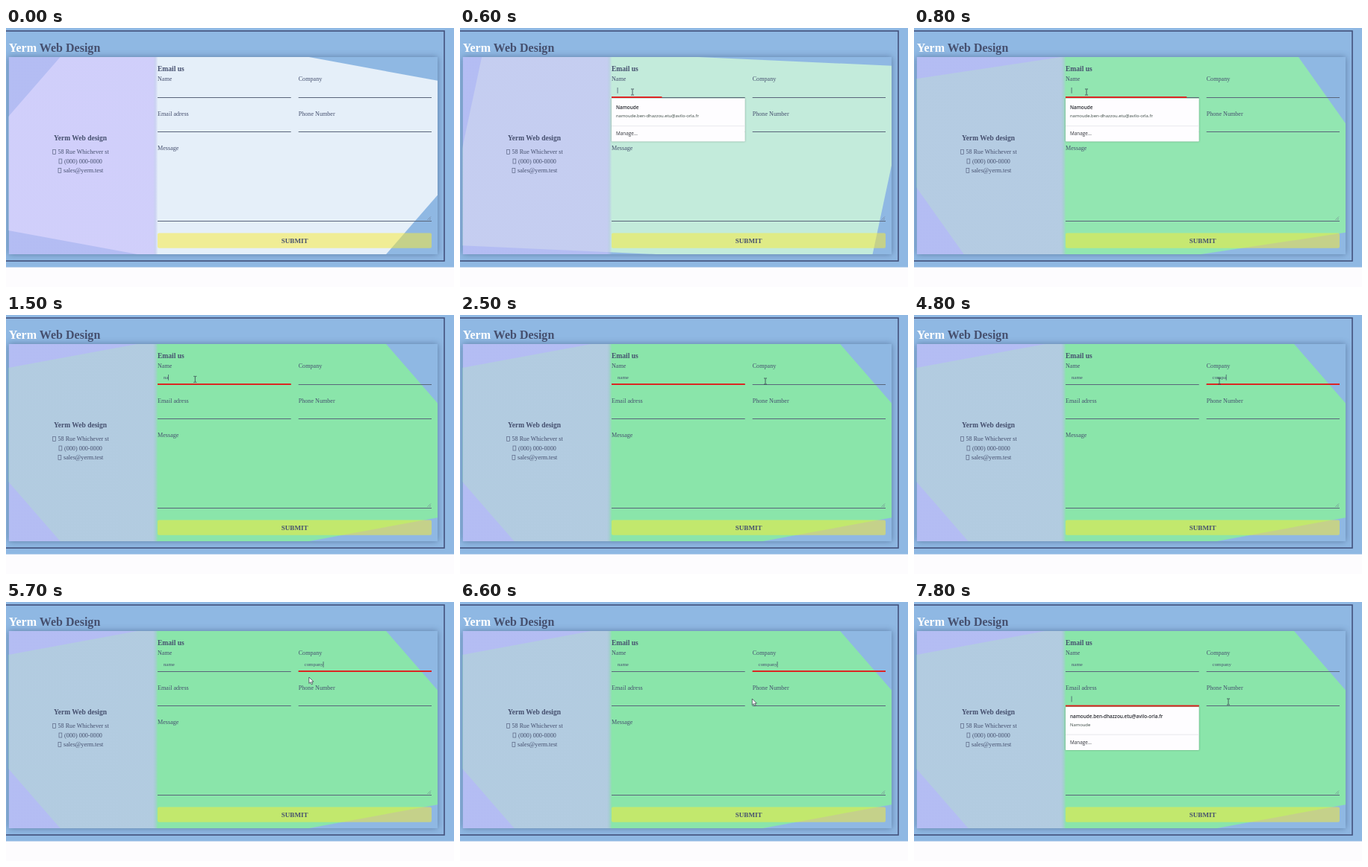
Recreate the animation shown at these times as an HTML page. Size 600 by 348 pixels, loop 8000 ms.

```html
<!DOCTYPE html>
<html lang="en">
<head>
<meta charset="utf-8">
<title>Contact form</title>
<style>
  html, body { margin: 0; width: 100%; height: 100%; overflow: hidden; background: #fdfcfe; }
  svg { display: block; width: 600px; height: 348px; }
  text { font: 8.15px "Liberation Serif", serif; fill: #46506f; white-space: pre; }
  .bold { font-weight: 700; }
  .heading { font-size: 9.5px; }
  .title { font-size: 16.05px; }
  .submit { font-size: 9.1px; }
  .value { font-size: 6.9px; }
  .menu text { font: 5.9px "Open Sans", sans-serif; fill: #37453f; }
  .menu .main { font-size: 6.4px; font-weight: 600; fill: #26282e; }
  .menu .manage { font-size: 6.4px; fill: #33363c; }
  .line { stroke: #59657a; stroke-width: 1; }
  .mid { text-anchor: middle; }
</style>
</head>
<body>
<svg viewBox="0 0 600 348">
  <defs>
    <clipPath id="card"><rect x="3.7" y="39" width="574.3" height="265"/></clipPath>
    <mask id="outside">
      <rect width="600" height="348" fill="#fff"/>
      <rect x="3.7" y="39" width="574.3" height="265"/>
    </mask>
    <filter id="glow" x="-5%" y="-10%" width="110%" height="120%"><feGaussianBlur stdDeviation="4.5"/></filter>
    <filter id="soft" x="-5%" y="-10%" width="110%" height="125%"><feGaussianBlur stdDeviation="1.3"/></filter>
    <linearGradient id="side" gradientUnits="userSpaceOnUse" x1="197" x2="203.5">
      <stop offset="0" stop-color="#c6bffb" stop-opacity=".67"/>
      <stop offset=".45" stop-color="#b9bdee" stop-opacity=".6"/>
      <stop offset="1" stop-color="#b9bdee" stop-opacity="0"/>
    </linearGradient>
  </defs>

  <rect width="600" height="348" fill="#fdfcfe"/>
  <rect width="600" height="321.5" fill="#8fb8e3"/>
  <rect x="-20" y="4" width="607" height="309" fill="none" stroke="#43507b" stroke-width="1.6"/>
  <text class="bold title" x="3.7" y="31.6"><tspan fill="#fff">Yerm</tspan> Web Design</text>

  <g mask="url(#outside)">
    <rect x="3.7" y="39" width="574.3" height="265" fill="#4b6890" opacity=".75" filter="url(#glow)"/>
  </g>
  <g clip-path="url(#card)">
    <polygon id="sheet"/>
    <rect x="3.7" y="39" width="200" height="265" fill="url(#side)"/>
  </g>

  <text class="bold heading mid" x="99.5" y="150.6">Yerm Web design</text>
  <g fill="none" stroke="#5a6483" stroke-width=".7">
    <rect x="62.7" y="163.5" width="3.8" height="6"/>
    <rect x="71" y="176" width="3.8" height="6"/>
    <rect x="70" y="188.5" width="3.8" height="6"/>
  </g>
  <text x="69.5" y="169.2">58 Rue Whichever st</text>
  <text x="78" y="181.8">(000) 000-0000</text>
  <text class="mid" x="103.7" y="194.4">sales@yerm.test</text>

  <text class="bold heading" x="203" y="58">Email us</text>
  <text x="203" y="71.2">Name</text>
  <text x="391.7" y="71.2">Company</text>
  <text x="203" y="117.8">Email adress</text>
  <text x="391.7" y="117.8">Phone Number</text>
  <text x="203" y="164.4">Message</text>
  <path class="line" d="M203 93.5h178.7M391.7 93.5h178.3M203 139.5h178.7M391.7 139.5h178.3M203 259.5h367"/>
  <path d="M564.5 258l4.5-4.5M567 258l2-2" stroke="#687588" stroke-width=".6"/>
  <rect x="203" y="275.5" width="367" height="20.3" rx="2" fill="#fbeb33" fill-opacity=".5"/>
  <text class="bold submit mid" x="386.7" y="288.7">SUBMIT</text>

  <g id="fields"></g>
  <g id="beam" fill="none" stroke="#2e3a48" stroke-width=".8">
    <path d="M-2 -4h1.4l.6 .5l.6 -.5h1.4M0 -3.5v7M-2 4h1.4l.6 -.5l.6 .5h1.4"/>
  </g>
  <path id="arrow" d="M0 0v8.4l2-1.8l1.4 3.2l1.5-.7l-1.4-3h2.6z" fill="#fff" stroke="#2b3040" stroke-width=".7"/>
</svg>

<script>
const LOOP = 8000, STEP = 100, FADE = 500, BLINK = 530;
const CARD = { x: 3.7, y: 39, w: 574.3, h: 265 };
const PALE = [229, 239, 249], GREEN = [138, 229, 170];
const PERSON = 'Namoude', MAIL = 'namoude.ben-dhazzou.etu@avilo-orla.fr';

// Focus time, blur time and the moment of each key press
const fields = [
  { x: 203, y: 93, w: 178.7, on: 482, off: 3260, word: 'name',
    keys: [1390, 1490, 1590, 1730], menu: [PERSON, MAIL] },
  { x: 391.7, y: 93, w: 178.3, on: 3260, off: 6730, word: 'company',
    keys: [3960, 4080, 4480, 4580, 4780, 4980, 5180] },
  { x: 203, y: 139.5, w: 178.7, on: 6730, off: Infinity, word: '',
    keys: [], menu: [MAIL, PERSON] },
];

// Pointer: time, x, y
const path = [
  [200, 262, 150], [300, 231, 86], [1400, 231, 86], [2200, 409, 89],
  [5300, 409, 89], [5800, 405, 104], [6400, 402, 118], [6600, 391.3, 130],
  [6700, 372, 133], [6900, 372, 133], [7500, 421, 134],
];

const $ = id => document.getElementById(id);
const mix = (a, b, k) => a + (b - a) * k;
const clamp = v => Math.min(1, Math.max(0, v));

function add(parent, tag, attrs, text) {
  const node = document.createElementNS('http://www.w3.org/2000/svg', tag);
  for (const key in attrs) node.setAttribute(key, attrs[key]);
  if (text) node.textContent = text;
  return parent.appendChild(node);
}

// CSS "ease": cubic-bezier(.25, .1, .25, 1)
function ease(t) {
  t = clamp(t);
  const curve = (u, a, b) => 3 * a * u * (1 - u) ** 2 + 3 * b * u * u * (1 - u) + u ** 3;
  let lo = 0, hi = 1;
  for (let i = 0; i < 24; i++) {
    const u = (lo + hi) / 2;
    if (curve(u, .25, .25) < t) lo = u; else hi = u;
  }
  return curve(lo, .1, 1);
}

function buildMenu(field) {
  const top = field.y + 1.5, left = field.x + 6;
  const g = add($('fields'), 'g', { class: 'menu' });
  const box = { x: field.x, y: top, width: field.w, height: 58, rx: 1 };
  add(g, 'rect', { ...box, fill: '#31523f', opacity: .5, filter: 'url(#soft)' });
  add(g, 'rect', { ...box, fill: '#fefdff' });
  add(g, 'text', { class: 'main', x: left, y: top + 14.7 }, field.menu[0]);
  add(g, 'text', { x: left, y: top + 25.5 }, field.menu[1]);
  add(g, 'path', { d: `M${field.x} ${top + 37.2}h${field.w}`, stroke: '#e4e4e9', 'stroke-width': .8 });
  add(g, 'text', { class: 'manage', x: left, y: top + 49.8 }, 'Manage...');
  return g;
}

for (const f of fields) {
  const root = $('fields');
  if (f.menu) f.menuNode = buildMenu(f);
  f.bar = add(root, 'rect', { x: f.x, y: f.y - .9, height: 1.9, fill: '#e01c1c' });
  f.text = add(root, 'text', { class: 'value', x: f.x + 7.9, y: f.y - 7 });
  f.caret = add(root, 'rect', { y: f.y - 13, width: .7, height: 7.8, fill: '#3c4660' });
}

function drawField(f, t) {
  const typed = f.keys.filter(k => k <= t);
  const focused = t >= f.on && t < f.off;
  const last = typed.length ? typed[typed.length - 1] : f.on;
  const fill = ease((t - f.on) / FADE) - ease((t - f.off) / FADE);
  f.bar.setAttribute('width', f.w * fill);
  f.text.textContent = f.word.slice(0, typed.length);
  const width = typed.length ? f.text.getComputedTextLength() : 0;
  f.caret.setAttribute('x', f.x + 7.7 + width);
  f.caret.style.opacity = focused && Math.floor((t - last) / BLINK) % 2 === 0 ? 1 : 0;
  if (f.menuNode) f.menuNode.style.display = focused && !typed.length ? '' : 'none';
}

// The corners of the sheet slide along the card's diagonals
function drawSheet(k) {
  const s = mix(.2, -.2, k);
  const corners = [[s, -s], [1 + s, s], [1 - s, 1 + s], [-s, 1 - s]];
  const points = corners.map(([x, y]) => [CARD.x + x * CARD.w, CARD.y + y * CARD.h]);
  $('sheet').setAttribute('points', points.join(' '));
  $('sheet').setAttribute('fill', `rgb(${PALE.map((v, i) => Math.round(mix(v, GREEN[i], k)))})`);
}

function drawPointer(t) {
  let i = 0;
  while (i < path.length - 2 && t > path[i + 1][0]) i++;
  const [a, b] = [path[i], path[i + 1]];
  const k = clamp((t - a[0]) / (b[0] - a[0]));
  const x = mix(a[1], b[1], k), y = mix(a[2], b[2], k);
  const overField = (x < 382 || x > 391.7) && ((y > 77 && y < 95) || (y > 123 && y < 141) || y > 168);
  const shown = t >= path[0][0];
  for (const [id, active] of [['beam', overField], ['arrow', !overField]]) {
    $(id).setAttribute('transform', `translate(${x} ${y})`);
    $(id).style.display = shown && active ? '' : 'none';
  }
}

function draw(time) {
  const t = Math.floor((time % LOOP) / STEP) * STEP;
  drawSheet(ease((t - fields[0].on) / FADE));
  fields.forEach(f => drawField(f, t));
  drawPointer(t);
}

const start = performance.now();
function tick() {
  draw(performance.now() - start);
  requestAnimationFrame(tick);
}
tick();
</script>
</body>
</html>
```
